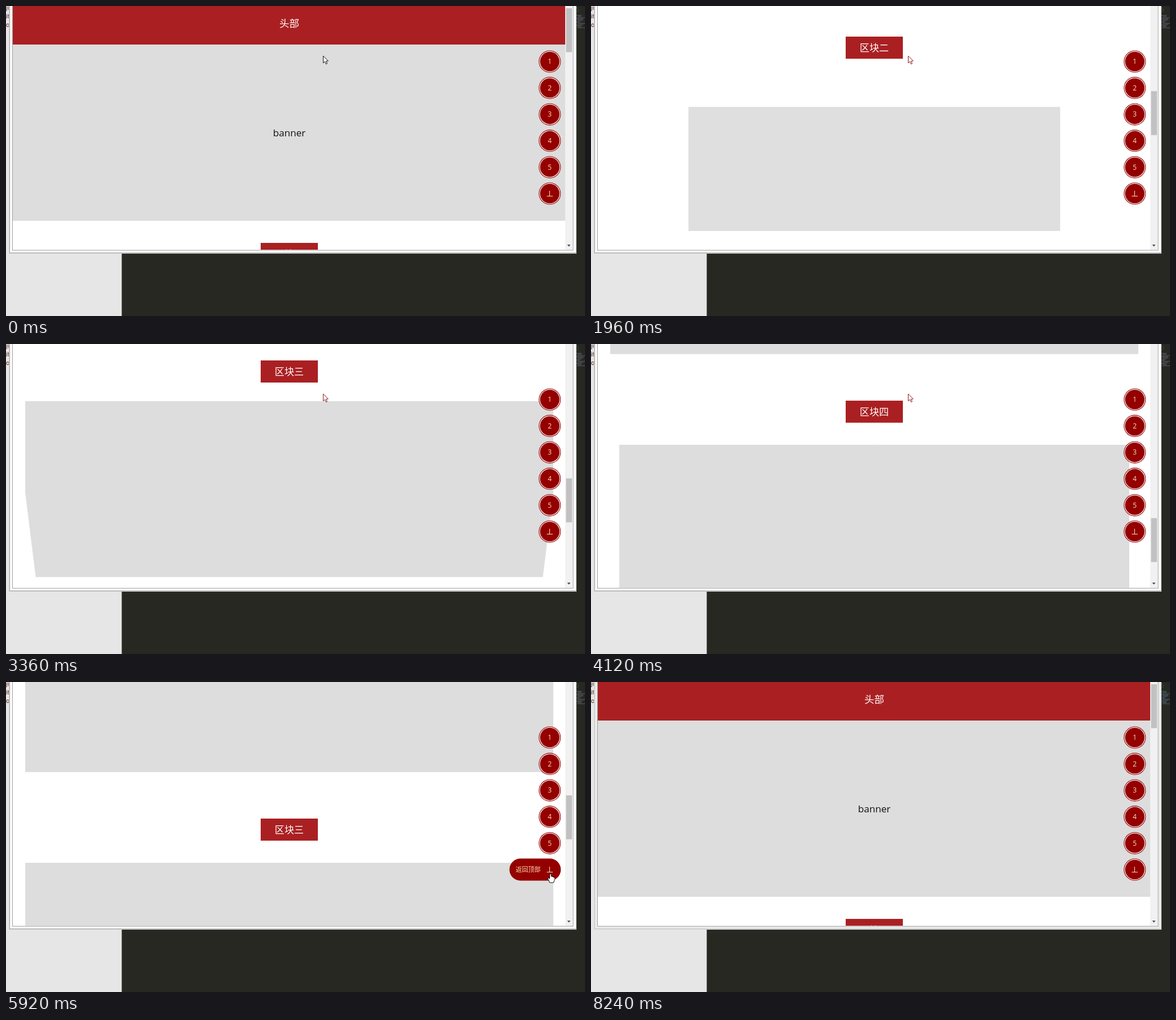
An HTML page with a canvas for the animation above (8400 ms loop, 1023x547 px).

```html
<!DOCTYPE html>
<html lang="zh-CN">
<head>
<meta charset="utf-8">
<title>滚动动画</title>
<style>
html, body { margin: 0; width: 100%; height: 100%; overflow: hidden; background: #272822; }
canvas { display: block; }
</style>
</head>
<body>
<canvas id="stage" width="1023" height="547"></canvas>
<script>
const ctx = document.getElementById('stage').getContext('2d');
const LOOP = 8400, STEP = 40, ZOOM = 0.777;
const RED = '#aa2022', DARK_RED = '#940000', GREY = '#dddddd', CREAM = '#ffe0b0';
const CJK = '"Noto Sans CJK SC", "Noto Sans CJK", sans-serif';
const LATIN = '"Open Sans", sans-serif';

// Page layout, in stage pixels at scroll 0
const VIEW = { x: 12, w: 976, bottom: 430 };
const CONTENT = { x: 34, w: 933 };
const HALF_W = 451, BOX_H = 311, GAP = 39, PITCH = 471, FIRST = 418, MAX_SCROLL = 1907;

const clamp = x => Math.min(1, Math.max(0, x));
const mix = (a, b, p) => a + (b - a) * p;
const linear = p => p;
const swing = p => 0.5 - Math.cos(Math.PI * p) / 2;

function bezier(x1, y1, x2, y2) {
  const at = (a, b, s) => 3 * (1 - s) ** 2 * s * a + 3 * (1 - s) * s * s * b + s ** 3;
  return x => {
    let lo = 0, hi = 1;
    for (let i = 0; i < 30; i++) {
      const mid = (lo + hi) / 2;
      if (at(x1, x2, mid) < x) lo = mid; else hi = mid;
    }
    return at(y1, y2, lo);
  };
}
const ease = bezier(0.25, 0.1, 0.25, 1);
const easeIn = bezier(0.42, 0, 1, 1);
const easeOut = bezier(0.215, 0.61, 0.355, 1);

// steps: [time, ...values]
function track(steps, t, timing = linear) {
  if (t <= steps[0][0]) return steps[0].slice(1);
  for (let i = 1; i < steps.length; i++) {
    const [a, b] = [steps[i - 1], steps[i]];
    if (t < b[0]) {
      const p = timing((t - a[0]) / (b[0] - a[0]));
      return a.slice(1).map((v, k) => mix(v, b[k + 1], p));
    }
  }
  return steps[steps.length - 1].slice(1);
}

const SCROLL = [[280, 0], [400, 78], [840, 233], [1120, 400], [1640, 622], [1800, 622],
  [1960, 835], [2040, 855], [2600, 1010], [2800, 1010], [3360, 1331], [3560, 1485], [4520, MAX_SCROLL]];
const POINTER = [[5040, 560.5, 88], [5360, 962, 338], [5920, 962, 338], [6320, 890, 290], [6480, 880, 285],
  [6640, 735, 194.5], [6800, 650, 130], [6920, 690, 86], [7320, 955, 422], [7400, 968, 432], [7880, 1020, 546]];
const FLIP_IN = [[0, 90], [0.4, -20], [0.6, 10]];
const FLIP_END = [[0.6, 10], [0.8, -5], [1, 0]];

const scrollAt = t => t < 5600 ? track(SCROLL, t)[0]
  : MAX_SCROLL * (1 - swing(clamp((t - 5600) / 720)));

// Offset and opacity of an entrance that overshoots and settles
function bounce(t, start, from, over) {
  const p = clamp((t - start) / 1000);
  const s = Math.sign(over);
  const [d, alpha] = track([[0, from, 0], [0.6, over, 1], [0.75, -10 * s, 1], [0.9, 5 * s, 1], [1, 0, 1]], p, easeOut);
  return [d * ZOOM, alpha];
}

function rect(x, y, w, h, color) {
  ctx.fillStyle = color;
  ctx.fillRect(x, y, w, h);
}

function poly(points, fill, stroke, dx = 0, dy = 0) {
  ctx.beginPath();
  points.forEach(([x, y]) => ctx.lineTo(x + dx, y + dy));
  ctx.closePath();
  ctx.fillStyle = fill;
  ctx.fill();
  if (stroke) {
    ctx.strokeStyle = stroke;
    ctx.lineWidth = 1;
    ctx.stroke();
  }
}

function text(str, x, y, size, color, family = CJK, align = 'center') {
  ctx.font = `${size}px ${family}`;
  ctx.textAlign = align;
  ctx.fillStyle = color;
  ctx.fillText(str, x, y);
}

function clipped(x, y, w, h, draw) {
  ctx.save();
  ctx.beginPath();
  ctx.rect(x, y, w, h);
  ctx.clip();
  draw();
  ctx.restore();
}

function fadedBox(x, y, w, h, alpha) {
  ctx.globalAlpha = alpha;
  rect(x, y, w, h, GREY);
  ctx.globalAlpha = 1;
}

const RIGHT_X = CONTENT.x + CONTENT.w - HALF_W;

const boxes = [
  (y, t) => {
    const [up, a] = bounce(t, 352, 3000, -20);
    const [down, b] = bounce(t, 489, -3000, 25);
    fadedBox(CONTENT.x, y + up, HALF_W, BOX_H, a);
    fadedBox(RIGHT_X, y + down, HALF_W, BOX_H, b);
  },
  (y, t) => {
    const p = clamp((t - 1626) / 1000);
    const k = mix(0.3, 1, ease(p));
    const w = CONTENT.w * k, h = BOX_H * k;
    fadedBox(500.5 - w / 2, y + (BOX_H - h) / 2, w, h, ease(clamp(p / 0.5)));
  },
  (y, t) => {
    const p = clamp((t - 2594) / 1000);
    const deg = p < 0.6 ? track(FLIP_IN, p, easeIn)[0] : track(FLIP_END, p, ease)[0];
    const angle = deg * Math.PI / 180, depth = 400 * ZOOM;
    const corner = (sx, sy) => {
      const v = sy * BOX_H / 2;
      const k = depth / (depth - v * Math.sin(angle));
      return [500.5 + sx * CONTENT.w / 2 * k, y + BOX_H / 2 + v * Math.cos(angle) * k];
    };
    ctx.globalAlpha = easeIn(clamp(p / 0.6));
    poly([corner(-1, -1), corner(1, -1), corner(1, 1), corner(-1, 1)], GREY);
    ctx.globalAlpha = 1;
  },
  (y, t) => {
    const [left, a] = bounce(t, 3560, -3000, 25);
    const [right, b] = bounce(t, 3560, 3000, -25);
    fadedBox(CONTENT.x + left, y, HALF_W, BOX_H, a);
    fadedBox(RIGHT_X + right, y, HALF_W, BOX_H, b);
  }
];

function drawPage(t, scroll) {
  rect(VIEW.x, 0, VIEW.w, VIEW.bottom, '#fff');
  rect(VIEW.x, -10 - scroll, VIEW.w, 78, RED);
  text('头部', 500.5, 36.5 - scroll, 17.5, '#fff');
  rect(VIEW.x, 68 - scroll, VIEW.w, BOX_H, GREY);
  text('banner', 500.5, 230 - scroll, 17.1, '#111', LATIN);

  [...'一二三四'].forEach((number, i) => {
    const top = FIRST + i * PITCH - scroll;
    if (top > VIEW.bottom || top < -GAP * 2 - BOX_H) return;
    clipped(CONTENT.x, top, CONTENT.w, GAP * 3 + BOX_H, () => {
      rect(450, top, 101, GAP, RED);
      text('区块' + number, 500.5, top + 26, 17.1, '#fff');
      boxes[i](top + GAP * 2, t);
    });
  });

  const footer = 352 + MAX_SCROLL - scroll;
  rect(VIEW.x, footer, VIEW.w, 78, RED);
  text('尾部', 500.5, footer + 45.5, 17.5, '#fff');
}

function disc(x, y, r, color) {
  ctx.beginPath();
  ctx.arc(x, y, r, 0, Math.PI * 2);
  ctx.fillStyle = color;
  ctx.fill();
}

function drawButtons(t) {
  const open = track([[5400, 0], [5600, 1], [6000, 1], [6160, 0]], t)[0];
  for (let i = 0; i < 6; i++) {
    const x = 960.8, y = 98 + i * 46.6;
    if (i === 5 && open > 0) {
      const left = 941.5 - 52 * open;
      ctx.beginPath();
      ctx.roundRect(left, y - 19.5, 980.3 - left, 39, 19.5);
      ctx.fillStyle = DARK_RED;
      ctx.fill();
      clipped(left + 10, y - 12, Math.max(0, 934 - left), 24,
        () => text('返回顶部', left + 11, y + 4, 11, CREAM, CJK, 'left'));
    } else {
      disc(x, y, 19.5, DARK_RED);
      disc(x, y, 18.4, '#fff');
      disc(x, y, 17.2, DARK_RED);
    }
    if (i < 5) {
      text(i + 1, x, y + 4.2, 12, CREAM, LATIN);
    } else {
      rect(960, y - 5, 1, 9, CREAM);
      rect(955.5, y + 4, 10.5, 1, CREAM);
    }
  }
}

function drawScrollbar(t, scroll) {
  rect(988, 0, 13, VIEW.bottom, '#f1f1f1');
  rect(989.5, 4 + scroll * 334 / MAX_SCROLL, 10.5, 77.5, '#c1c1c1');
  const atEnd = scroll >= MAX_SCROLL && t >= 4560;
  poly([[991.5, 421], [997.5, 421], [994.5, 424.5]], atEnd ? '#a3a3a3' : '#505050');
}

function drawDesktop(t) {
  rect(0, 0, 1023, 547, '#272822');
  rect(0, 0, 204.5, 547, '#e6e6e6');
  ['ju', 'ite', 'ov'].forEach((s, i) => text(s, 0, 7 + i * 15, 10, '#5a1a14', '"DejaVu Sans", sans-serif', 'left'));
  const tints = t < 7640 ? ['#59606b', '#6b5361', '#4b5b66'] : ['#3f6476', '#586273', '#3e5867'];
  for (let i = 0; i < 15; i++) {
    const y = i < 3 ? 3 + i * 3 : 10 + i * 2;
    rect(1008 + i * 5 % 3, y, i < 3 ? 2 : 6 + i * 7 % 9, 1, tints[i % 3]);
  }
}

function drawWindow(active) {
  rect(5, 0, 1003, 437, active ? '#cfcfcf' : '#dcdcdc');
  rect(6, 0, 1001.5, 436, active ? '#a8a8a8' : '#c4c4c4');
  rect(7, 0, 1000, 435, active ? '#fafafa' : '#ebebeb');
  rect(11, 0, 991.5, 431.5, '#a0a0a0');
  rect(12, 0, 989.5, 430.5, '#fff');
}

const ARROW = [[0, 0], [0, 12.5], [3, 10], [5, 14.5], [7, 13.6], [5.1, 9.2], [8.8, 9]];
const HAND = [[-1, 0], [1, 0], [1.5, 5], [4, 5.5], [7, 7], [8, 9], [6.5, 13], [5.5, 16],
  [-1.5, 16], [-3, 12], [-5, 9], [-4, 7.5], [-1.5, 9]];

function drawPointer(t) {
  if (t >= 7900) return;
  const [x, y] = track(POINTER, t);
  if (t >= 5360 && t < 6000) poly(HAND, '#fff', '#111', x, y);
  else poly(ARROW, '#fff', t >= 1160 && t < 5040 ? '#8b1a1a' : '#111', x, y);
}

function draw(t) {
  const scroll = scrollAt(t);
  drawDesktop(t);
  drawWindow(t < 8240);
  clipped(VIEW.x, 0, 989, VIEW.bottom, () => {
    drawPage(t, scroll);
    drawScrollbar(t, scroll);
    drawButtons(t);
  });
  drawPointer(t);
}

const start = performance.now();
function tick() {
  const t = (performance.now() - start) % LOOP;
  draw(Math.floor(t / STEP) * STEP);
  requestAnimationFrame(tick);
}
tick();
</script>
</body>
</html>
```
